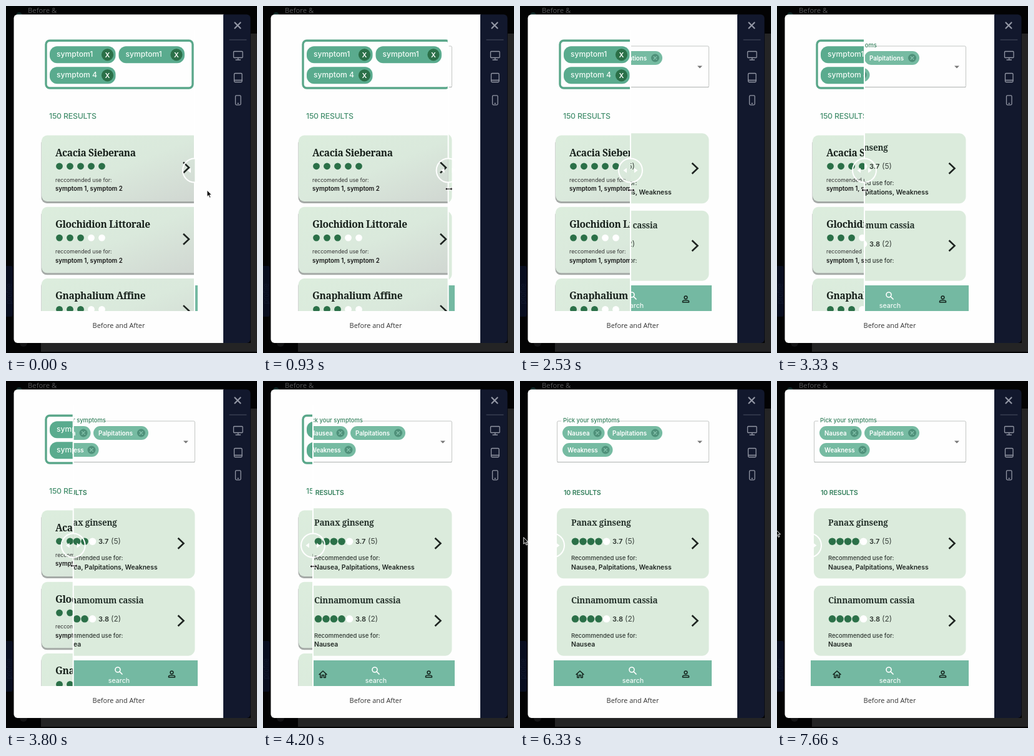
An HTML page that plays this animation: 402x554 px, repeating every 8000 ms.

```html
<!DOCTYPE html>
<html lang="en">
<head>
<meta charset="utf-8">
<title>Before and After</title>
<style>
  html, body { margin: 0; width: 100%; height: 100%; overflow: hidden; background: #030304; }
  svg { display: block; width: 100%; height: 100%; }
  text { font-family: Inter, "Open Sans", sans-serif; white-space: pre; }
  .open { font-family: "Open Sans", sans-serif; }
  .serif { font-family: "Noto Serif", serif; font-weight: 600; }
  .line { fill: none; stroke-linecap: round; stroke-linejoin: round; }
</style>
</head>
<body>
<svg id="stage" viewBox="0 0 402 554" xmlns="http://www.w3.org/2000/svg">
  <defs>
    <clipPath id="view"><rect x="54" y="38" width="254" height="449"/></clipPath>
    <clipPath id="cut"><rect id="cutBox" x="54" y="38" width="248" height="449"/></clipPath>
    <clipPath id="modal"><rect x="12.5" y="13.5" width="379" height="524.5" rx="6"/></clipPath>
    <linearGradient id="shade" x1="0" y1="0" x2="1" y2="1">
      <stop offset="0" stop-color="#dceddd"/>
      <stop offset=".5" stop-color="#dae9dc"/>
      <stop offset="1" stop-color="#d0d6d1"/>
    </linearGradient>
  </defs>

  <!-- dimmed page -->
  <rect width="402" height="554" fill="#030304"/>
  <path d="M392 44H402V552H56V538H392Z" fill="#242425"/>
  <text class="open" x="35" y="10.7" font-size="11.3" fill="#565658">Before &amp;</text>
  <circle cx="21" cy="15" r="5" fill="#0d2524"/>
  <circle cx="28" cy="538" r="6" fill="#141416"/>
  <rect x="-4" y="415" width="15" height="81" rx="3" fill="#080d1f"/>
  <text transform="translate(9 476) rotate(-90)" font-size="11" fill="#12182e">profile</text>

  <!-- modal -->
  <g clip-path="url(#modal)">
    <rect x="12" y="13" width="337" height="526" fill="#fefefe"/>
    <rect x="348" y="13" width="44" height="526" fill="#12182d"/>
  </g>
  <g class="line" stroke="#9397a5" stroke-width="1.3">
    <path d="M366.5 26.5L375.5 35.5M375.5 26.5L366.5 35.5" stroke-width="2.2"/>
    <path d="M358 54H385" stroke="#4b5063" stroke-width="1"/>
    <rect x="364.5" y="72.5" width="14.5" height="10" rx="1"/>
    <path d="M371.7 83V85.5M368 86H375.5"/>
    <rect x="365.5" y="107.5" width="12.5" height="14" rx="1.5"/>
    <path d="M366 118.5H378"/>
    <rect x="367.5" y="142.8" width="8.5" height="15" rx="1.5"/>
    <path d="M371 155.5H372.5"/>
  </g>
  <text class="open" x="180.5" y="514" font-size="10.9" fill="#333" text-anchor="middle">Before and After</text>

  <g clip-path="url(#view)">
    <g id="after"></g>
    <g id="before" clip-path="url(#cut)"></g>
    <g id="handle">
      <path d="M0 38V243M0 282V487" stroke="#fff" stroke-width="2"/>
      <circle cy="262.5" r="19" fill="none" stroke="#fff" stroke-width="2"/>
      <path d="M-11.5 262.5L-6 258.5V266.5ZM11.5 262.5L6 258.5V266.5Z" fill="#fff"/>
    </g>
  </g>

  <g id="pointer" fill="#111" stroke="#fff" stroke-width=".9" stroke-linejoin="round">
    <path id="arrow" d="M0 0V10.5L2.4 8.3L4.2 12.3L6 11.5L4.3 7.7H7.5Z"/>
    <path id="resize" d="M-6 0L-2.8 -3V-1H2.8V-3L6 0L2.8 3V1H-2.8V3Z"/>
  </g>
</svg>
<script>
const $ = id => document.getElementById(id);
const DARK = '#2b7048';

const rect = (x, y, w, h, r, fill, extra = '') =>
  `<rect x="${x}" y="${y}" width="${w}" height="${h}" rx="${r}" fill="${fill}" ${extra}/>`;
const disc = (x, y, r, fill) => `<circle cx="${x}" cy="${y}" r="${r}" fill="${fill}"/>`;
const text = (x, y, size, fill, str, weight = 500, extra = '') =>
  `<text x="${x}" y="${y}" font-size="${size}" fill="${fill}" font-weight="${weight}" ${extra}>${str}</text>`;
const title = (x, y, size, fill, str, gap) =>
  text(x, y, size, fill, str, 600, `class="serif" letter-spacing="${gap}"`);
const line = (d, color, width) =>
  `<path class="line" d="${d}" stroke="${color}" stroke-width="${width}"/>`;
const cross = (x, y, r, color, width) =>
  line(`M${x - r} ${y - r}l${2 * r} ${2 * r}m0 ${-2 * r}l${-2 * r} ${2 * r}`, color, width);
const chevron = (x, y) =>
  `<path d="M${x - 4.5} ${y - 8.5}l9 8.5l-9 8.5" fill="none" stroke="#1e2421" stroke-width="2.6"/>`;
const dots = (x, y, step, r, full) =>
  [0, 1, 2, 3, 4].map(i => disc(x + i * step, y, r, i < full ? DARK : '#fff')).join('');

// Old design
function tag(x, y, label) {
  return rect(x, y, 105.5, 27, 12, '#5aab8e') +
    text(x + 11, y + 16.8, 12.1, '#f2fbf6', label) +
    disc(x + 92.5, y + 13.5, 9.6, DARK) +
    text(x + 92.5, y + 18, 11, '#fff', 'X', 600, 'text-anchor="middle"');
}

function oldCard(y, name, score) {
  return rect(56.5, y + 3, 252, 105.5, 9, '#a5aaa7') +
    rect(57, y, 252, 105.5, 9, 'url(#shade)') +
    title(79, y + 33.2, 15.5, '#17201b', name, -.38) +
    dots(85.5, y + 49.3, 17, 5.4, score) +
    text(79, y + 74, 8.7, '#333', 'reccomended use for:', 400) +
    text(79, y + 88.7, 9.7, '#161616', 'symptom 1, symptom 2', 600) +
    chevron(288.5, y + 51.5);
}

$('before').innerHTML =
  rect(54, 38, 254, 449, 0, '#fefefe') +
  rect(64, 55.3, 235, 75.7, 6, '#fefefe', 'stroke="#5aa78a" stroke-width="3.4"') +
  tag(70, 64.3, 'symptom1') + tag(180.5, 64.3, 'symptom1') + tag(70, 97.3, 'symptom 4') +
  text(69, 179.7, 12.3, '#46906f', '150 RESULTS', 500, 'letter-spacing="-.2"') +
  oldCard(206.5, 'Acacia Sieberana', 5) +
  oldCard(320.8, 'Glochidion Littorale', 3) +
  oldCard(435.1, 'Gnaphalium Affine', 3);

// New design
function chip(x, y, w, label) {
  const cx = x + w - 11.5, cy = y + 11;
  return rect(x, y, w, 22, 11, '#76bba2') +
    text(x + 8, y + 14.5, 9.7, '#fff', label, 600) +
    disc(cx, cy, 6.5, '#4f917a') + cross(cx, cy, 2.3, '#86c4ad', 1.3);
}

function newCard(y, name, rating, count, uses) {
  return rect(59, y, 243.5, 112, 11, '#dbebdc') +
    title(82, y + 28, 13.5, '#27342d', name, -.2) +
    dots(88.5, y + 53, 12.5, 5.8, 4) +
    text(148, y + 57, 11, '#2b332e', rating, 600) +
    text(168, y + 57, 12, '#3a423d', `(${count})`, 400) +
    text(82, y + 83, 9.5, '#2f3732', 'Recommended use for:') +
    text(82, y + 97.5, 10.4, '#1f2622', uses, 600) +
    chevron(280, y + 56);
}

$('after').innerHTML =
  rect(59.5, 64, 243, 65.5, 2, '#fefefe', 'stroke="#c3c6c4"') +
  line('M60 129.5H302', '#aeb2b0', 1) +
  rect(66, 60, 91, 8, 0, '#fefefe') +
  text(69, 66, 9.4, '#35805d', 'Pick your symptoms') +
  '<path d="M284 95.5h8l-4 4z" fill="#777"/>' +
  chip(68, 72, 67.5, 'Nausea') + chip(140, 72, 88, 'Palpitations') + chip(68, 99, 80.5, 'Weakness') +
  text(70, 181.5, 10.7, '#35805d', '10 RESULTS', 600, 'letter-spacing="-.2"') +
  newCard(203.2, 'Panax ginseng', '3.7', 5, 'Nausea, Palpitations, Weakness') +
  newCard(326.8, 'Cinnamomum cassia', '3.8', 2, 'Nausea') +
  rect(54, 446, 253, 41, 0, '#74b9a2') +
  line('M90 468.5L96 463L102 468.5M91.8 467.5V473.5H94.5V469.5H97.5V473.5H100.2V467.5', '#14241d', 1.5) +
  '<circle class="line" cx="179" cy="461" r="4" stroke="#fff" stroke-width="1.6"/>' +
  line('M182 464L186 468', '#fff', 1.7) +
  text(181, 482, 10.6, '#f4fbf8', 'search', 500, 'text-anchor="middle"') +
  '<circle class="line" cx="265.5" cy="465.3" r="2.4" stroke="#14241d" stroke-width="1.5"/>' +
  line('M260.5 473V471.5C260.5 469 270.5 469 270.5 471.5V473Z', '#14241d', 1.5);

const LOOP = 8000, STEP = 1000 / 15;
const GRAB = 860, DROP = 4700;
// [time, divider x]
const SLIDE = [[GRAB, 302], [1600, 248], [2533, 177], [3333, 140], [4200, 80], [4600, 52]];
// [time, pointer x, pointer y]
const MOVE = [
  [460, 322, 294], [GRAB, 303, 292], [1600, 249, 293], [2533, 178, 294], [3333, 141, 294],
  [4200, 81, 296], [4600, 53, 296], [4800, 46, 296], [4933, 31, 295], [5460, 10, 262],
  [5860, 10, 262], [5930, 6, 250], [6330, 6, 250], [6400, 2, 243], [7530, 2, 243], [7660, -2, 237]
];

function at(keys, t, k = 1) {
  const i = keys.findIndex(key => key[0] > t);
  if (i === 0) return keys[0][k];
  if (i < 0) return keys[keys.length - 1][k];
  const a = keys[i - 1], b = keys[i];
  return a[k] + (b[k] - a[k]) * (t - a[0]) / (b[0] - a[0]);
}

function draw(now) {
  const t = Math.floor((now % LOOP + 8) / STEP) * STEP;
  const x = at(SLIDE, t);
  const drag = t >= GRAB && t < DROP;
  $('cutBox').setAttribute('width', Math.max(0, x - 54));
  $('handle').setAttribute('transform', `translate(${x} 0)`);
  $('pointer').setAttribute('transform', `translate(${at(MOVE, t)} ${at(MOVE, t, 2)})`);
  $('arrow').style.display = drag ? 'none' : '';
  $('resize').style.display = drag ? '' : 'none';
}

const start = performance.now();
function tick() {
  draw(performance.now() - start);
  requestAnimationFrame(tick);
}
tick();
</script>
</body>
</html>
```
